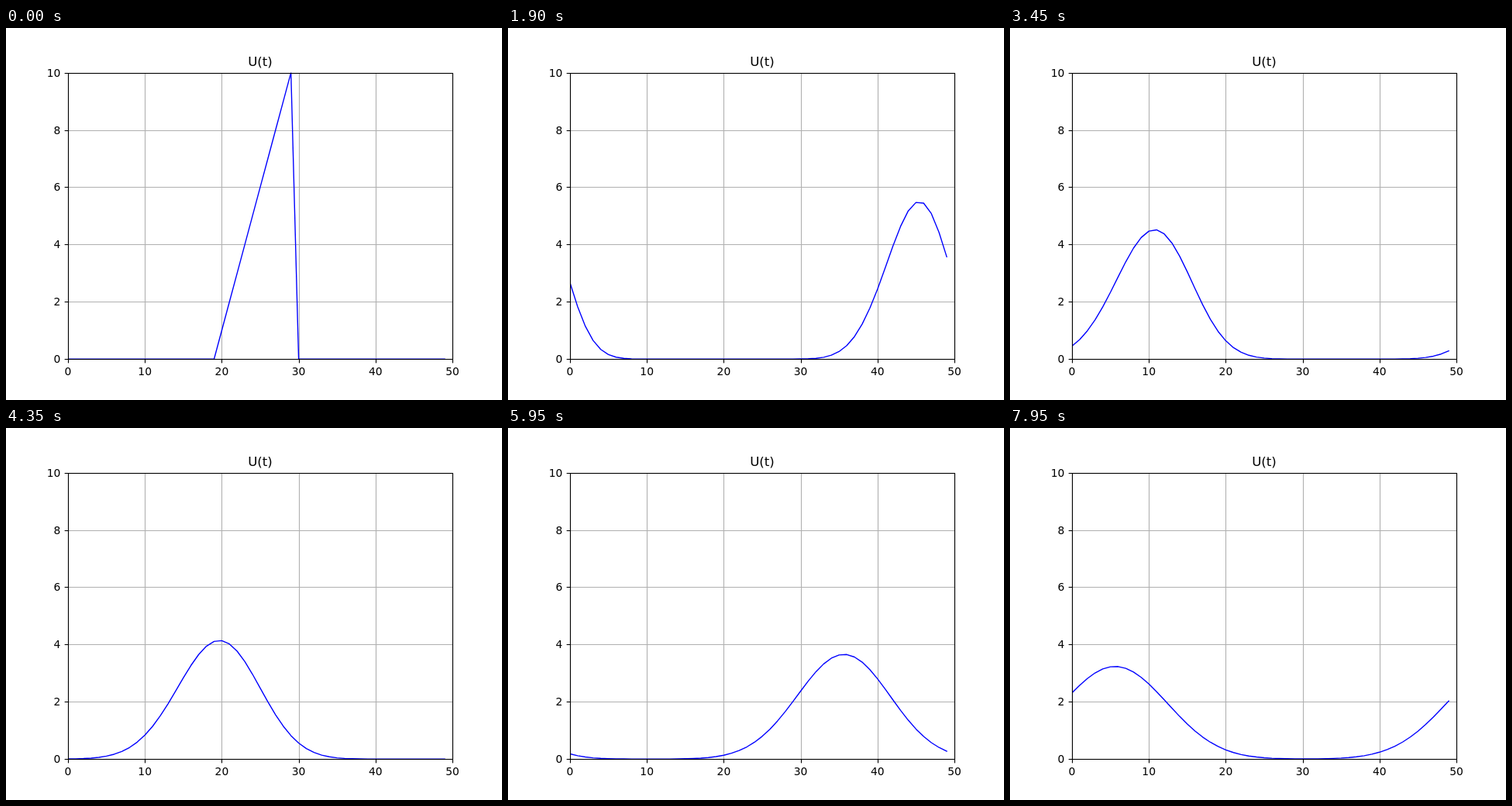
Write an HTML page with a canvas that moves like this. It is 640 by 480 pixels and loops after 8 s.

```html
<!DOCTYPE html>
<html lang="en">
<head>
<meta charset="utf-8">
<title>U(t)</title>
<style>
  html, body { margin: 0; width: 100%; height: 100%; overflow: hidden; background: #fff; }
  canvas { display: block; }
</style>
</head>
<body>
<canvas id="plot" width="640" height="480"></canvas>
<script>
const ctx = document.getElementById('plot').getContext('2d');
const STEP_MS = 50, STEPS = 160, POINTS = 50, COURANT = 0.5;
const LEFT = 80, TOP = 57.6, WIDTH = 496, HEIGHT = 369.6;
const THIN = 1.11, CURVE = 1.39;

const xPos = x => LEFT + x * WIDTH / 50;
const yPos = u => TOP + HEIGHT * (1 - u / 10);
const snap = v => Math.floor(v + 0.5) + 0.5;

// Upwind advection of a sawtooth pulse on a periodic grid.
const states = [Array.from({ length: POINTS }, (_, i) => i > 19 && i < 30 ? i - 19 : 0)];
while (states.length < STEPS) {
  const u = states[states.length - 1];
  states.push(u.map((v, i) => v - COURANT * (v - u[(i + POINTS - 1) % POINTS])));
}

function line(x1, y1, x2, y2, color) {
  ctx.strokeStyle = color;
  ctx.beginPath();
  ctx.moveTo(x1, y1);
  ctx.lineTo(x2, y2);
  ctx.stroke();
}

function label(text, x, y, size, align) {
  ctx.font = `${size}px "DejaVu Sans", sans-serif`;
  ctx.textAlign = align;
  ctx.fillText(text, x, y);
}

function drawCurve(u) {
  ctx.save();
  ctx.beginPath();
  ctx.rect(LEFT, TOP, WIDTH, HEIGHT);
  ctx.clip();
  ctx.strokeStyle = '#00f';
  ctx.lineWidth = CURVE;
  ctx.lineJoin = 'round';
  ctx.lineCap = 'square';
  ctx.beginPath();
  u.forEach((v, i) => ctx.lineTo(xPos(i), yPos(v)));
  ctx.stroke();
  ctx.restore();
}

function draw(u) {
  const bottom = snap(TOP + HEIGHT), left = snap(LEFT);
  const top = snap(TOP), right = snap(LEFT + WIDTH);
  ctx.fillStyle = '#fff';
  ctx.fillRect(0, 0, 640, 480);
  ctx.fillStyle = '#000';
  ctx.lineWidth = THIN;

  for (let i = 0; i <= 5; i++) {
    const x = snap(xPos(i * 10)), y = snap(yPos(i * 2));
    line(x, top, x, bottom, '#b0b0b0');
    line(left, y, right, y, '#b0b0b0');
  }

  drawCurve(u);

  for (let i = 0; i <= 5; i++) {
    const x = snap(xPos(i * 10)), y = snap(yPos(i * 2));
    line(x, bottom, x, bottom + 4.86, '#000');
    line(left, y, left - 4.86, y, '#000');
    label(i * 10, xPos(i * 10), 448, 13.89, 'center');
    label(i * 2, 70.3, Math.floor(y) + 5, 13.89, 'right');
  }
  ctx.strokeRect(left, top, right - left, bottom - top);
  label('U(t)', LEFT + WIDTH / 2, 49, 16.67, 'center');
}

function frame() {
  draw(states[Math.floor(performance.now() / STEP_MS) % STEPS]);
  requestAnimationFrame(frame);
}
frame();
</script>
</body>
</html>
```
